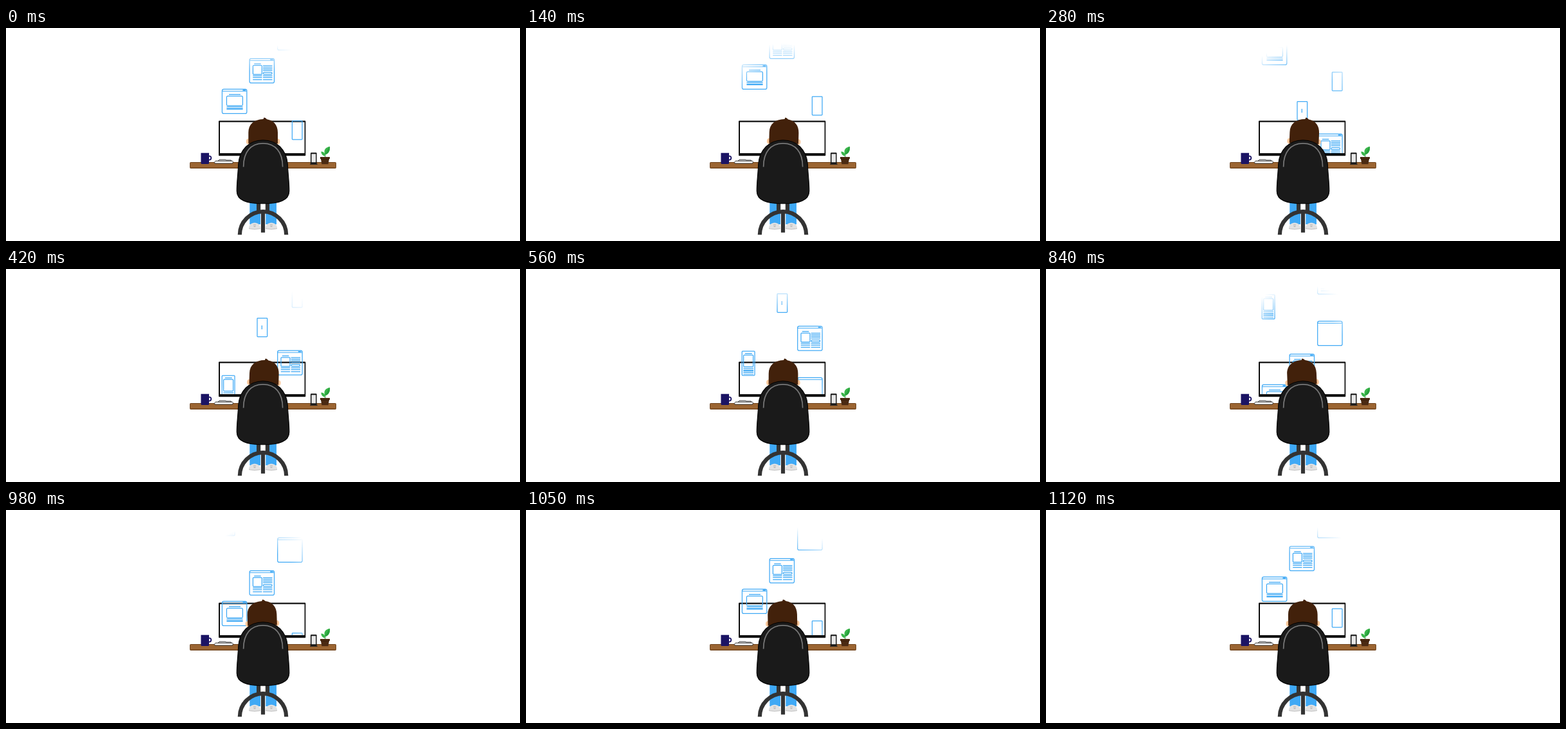
Animation, 800 px wide and 332 px high, one loop 1.19 s. Source, as an HTML page:

```html
<!DOCTYPE html>
<html lang="en">
<head>
<meta charset="utf-8">
<title>Working at the desk</title>
<style>
  html, body { margin: 0; width: 100%; height: 100%; overflow: hidden; background: #fff; }
  svg { display: block; width: 100vw; height: 100vh; }
</style>
</head>
<body>
<svg viewBox="0 0 800 332" xmlns="http://www.w3.org/2000/svg">
  <defs>
    <radialGradient id="fade" gradientUnits="userSpaceOnUse" cx="0" cy="0" r="1"
      gradientTransform="translate(398 140) scale(112 116)">
      <stop offset=".65" stop-color="#fff"/>
      <stop offset="1" stop-color="#fff" stop-opacity="0"/>
    </radialGradient>
    <mask id="glow" maskUnits="userSpaceOnUse" x="280" y="0" width="240" height="195">
      <rect x="280" width="240" height="195" fill="url(#fade)"/>
    </mask>
  </defs>

  <!-- desk and monitor -->
  <rect x="286.5" y="209.5" width="227" height="9" rx=".8" fill="#9b6532" stroke="#6f431d"/>
  <path d="M287 217.8H513" stroke="#7d4d22"/>
  <rect x="331" y="144.5" width="135.3" height="54.7" rx="1" fill="#0b0b0b"/>
  <rect x="333" y="146.7" width="131.6" height="48.4" fill="#fff"/>

  <!-- mug -->
  <circle cx="316.3" cy="202.6" r="3" fill="none" stroke="#1b1464" stroke-width="1.8"/>
  <path d="M303.4 194.8H316V210.5Q316 212 314.5 212H305Q303.4 212 303.4 210.5Z" fill="#1b1464"/>

  <!-- papers -->
  <g fill="#fff" stroke="#222" stroke-width=".9">
    <path d="M330 207.3L332 205.2H341L343 206H350L351 207.5Z"/>
    <path d="M326 207.3H352.5L353.5 208.7L352.5 211H325L324.3 209.5Z"/>
  </g>

  <!-- phone -->
  <rect x="474" y="194.3" width="9.6" height="17.5" rx="1" fill="#111"/>
  <rect x="475.5" y="196.3" width="6.7" height="13" fill="#e6e6e6"/>
  <path d="M473.3 212.2H484.6" stroke="#222" stroke-width="1.6"/>

  <!-- plant -->
  <path d="M496.5 202Q496 196 500 190" fill="none" stroke="#27913b" stroke-width="1"/>
  <path d="M496.5 197.5C493.5 190 497.5 186 504 184.8C504.5 191 502.5 196 496.5 197.5Z" fill="#39b54a"/>
  <path d="M496.8 197C498.5 192.5 500.5 189 504 184.8C504.5 191 502.5 196 496.8 197Z" fill="#27a03c"/>
  <path d="M496.4 199.5C493 199.5 490.6 196.5 490.4 192.5C494.5 192.7 497 195.5 496.4 199.5Z" fill="#39b54a"/>
  <path d="M489 201H504V204H503L501.5 212.3H491.5L490 204H489Z" fill="#4b2a12"/>
  <path d="M490 204.3H503" stroke="#33190a" stroke-width=".8"/>

  <g id="cards" mask="url(#glow)" fill="none" stroke="#3fa9f5" stroke-width="1.25"></g>

  <!-- head -->
  <g id="head">
    <ellipse cx="377.6" cy="177" rx="3.8" ry="4.4" fill="#fcc99c"/>
    <ellipse cx="422.6" cy="177" rx="3.8" ry="4.4" fill="#fcc99c"/>
    <path d="M377.3 180V163C377.3 150 386 142.6 400.5 142L401.5 139.5Q404 139.8 406 142.2C416.5 144 423 151 423 163V180Z" fill="#42210b"/>
  </g>

  <!-- legs and shoes -->
  <path d="M379.3 270H396V306H379.3ZM404.3 270H421V306H404.3Z" fill="#3fa9f5"/>
  <g id="shoes"></g>

  <!-- chair -->
  <path d="M390 270H396.2V285H390ZM403.8 270H410V285H403.8Z" fill="#333"/>
  <path d="M363.8 322.3A36.2 36.2 0 0 1 436.2 322.3" fill="none" stroke="#333" stroke-width="6.2"/>
  <path d="M400 284V318.8" stroke="#333" stroke-width="6.2"/>
  <path d="M400 174.8C422 174.8 436.5 190 438.3 212C439 229 440.8 240 440.8 254C440.8 269 425 273.8 400 273.8C375 273.8 359.2 269 359.2 254C359.2 240 361 229 361.7 212C363.5 190 378 174.8 400 174.8Z"
    fill="#1a1a1a" stroke="#000" stroke-width="1.1"/>
  <path d="M369.6 216.5C369.6 193 381 179.8 400 179.8C419 179.8 430.6 193 430.6 216.5" fill="none" stroke="#777" stroke-width="1.7"/>
</svg>

<script>
const STEP = 70, STEPS = 17, RISE = 19, CYCLE = 325;
const cardLayer = document.getElementById('cards');
const head = document.getElementById('head');

const box = (x, y, w, h, r = 1) =>
  `<rect x="${x}" y="${y}" width="${w}" height="${h}" rx="${r}"/>`;
const line = (x1, x2, y, w = 1.3) =>
  `<path d="M${x1} ${y}H${x2}" stroke-width="${w}"/>`;
const lines = (x1, x2, ys) => ys.map(y => line(x1, x2, y)).join('');

const browser = box(.4, .4, 38.4, 38, 2.5) + line(.5, 38.5, 3.4, 1) + line(32.5, 37, 2, 1.8);
const landing = browser + line(11, 29, 8.6) + box(7.4, 11.2, 25, 14.8, 1.8)
  + line(7.4, 32.6, 28) + line(7.4, 32.6, 31, 2.3);
const article = browser + line(7.5, 18, 8.6) + box(5.7, 11, 14, 14)
  + lines(21.3, 35.8, [11.3, 13.8, 16.3, 18.8]) + box(21.8, 21.8, 13.4, 3)
  + lines(5.5, 19.8, [27.2, 29.9, 33.2]) + lines(21.3, 35.8, [27.2, 29.9, 33.2]);
const frame = box(.4, .4, 38.4, 38, 2.5) + line(.5, 38.5, 3.4, 1);
const handset = box(.5, .5, 15.6, 29, .8);
const mobilePage = box(.4, .4, 19.8, 37.6, 1) + line(5, 16, 3.9) + box(2.8, 6.3, 15, 18.2)
  + line(2.5, 18.2, 27) + line(2.5, 18.2, 30.2, 2.2)
  + line(2.5, 18.2, 33, 1.6) + line(2.5, 18.2, 36, 1);

// top: position at the start of the loop
const cards = [
  { x: 336, top: 95, art: landing },
  { x: 378.7, top: 47.3, art: article },
  { x: 422.3, top: 321, art: frame },
  { x: 422.3, top: 240.8, art: article },
  { x: 444.9, top: 144.3, art: handset, fadeOut: true },
  { x: 335.8, top: 279.8, art: mobilePage },
  { x: 390.5, top: 190, art: handset + '<path d="M7.8 12V18"/>' }
];

for (const card of cards) {
  card.node = document.createElementNS('http://www.w3.org/2000/svg', 'g');
  card.node.innerHTML = card.art;
  cardLayer.append(card.node);
}

document.getElementById('shoes').innerHTML = [387, 413].map(x => `
  <g transform="translate(${x} 0)">
    <path d="M-9 313C-9.5 307 -5 303.5 0 303.5C5 303.5 9.5 307 9 313Q0 315.3 -9 313Z" fill="#e2e2e2"/>
    <path d="M-9 312.6Q0 315 9 312.6" fill="none" stroke="#c4c4c4"/>
    <path d="M-2 307H2M-1.5 309.5H1.5" stroke="#aaa"/>
  </g>`).join('');

function draw(time) {
  const step = Math.floor(time / STEP) % STEPS;
  const travel = step * RISE + (step > 8 ? 12 : 0);
  for (const { x, top, node, fadeOut } of cards) {
    const y = (top - travel + 50 + CYCLE) % CYCLE - 50;
    node.setAttribute('transform', `translate(${x} ${y})`);
    if (fadeOut) node.setAttribute('opacity', Math.max(0, Math.min(1, (y + 5) / 90)));
  }
  const tilt = 2.3 * Math.sin(2 * Math.PI * travel / CYCLE);
  head.setAttribute('transform', `rotate(${tilt} 400 215)`);
}

const start = performance.now();
function tick() {
  draw(performance.now() - start);
  requestAnimationFrame(tick);
}
draw(0);
requestAnimationFrame(tick);
</script>
</body>
</html>
```
